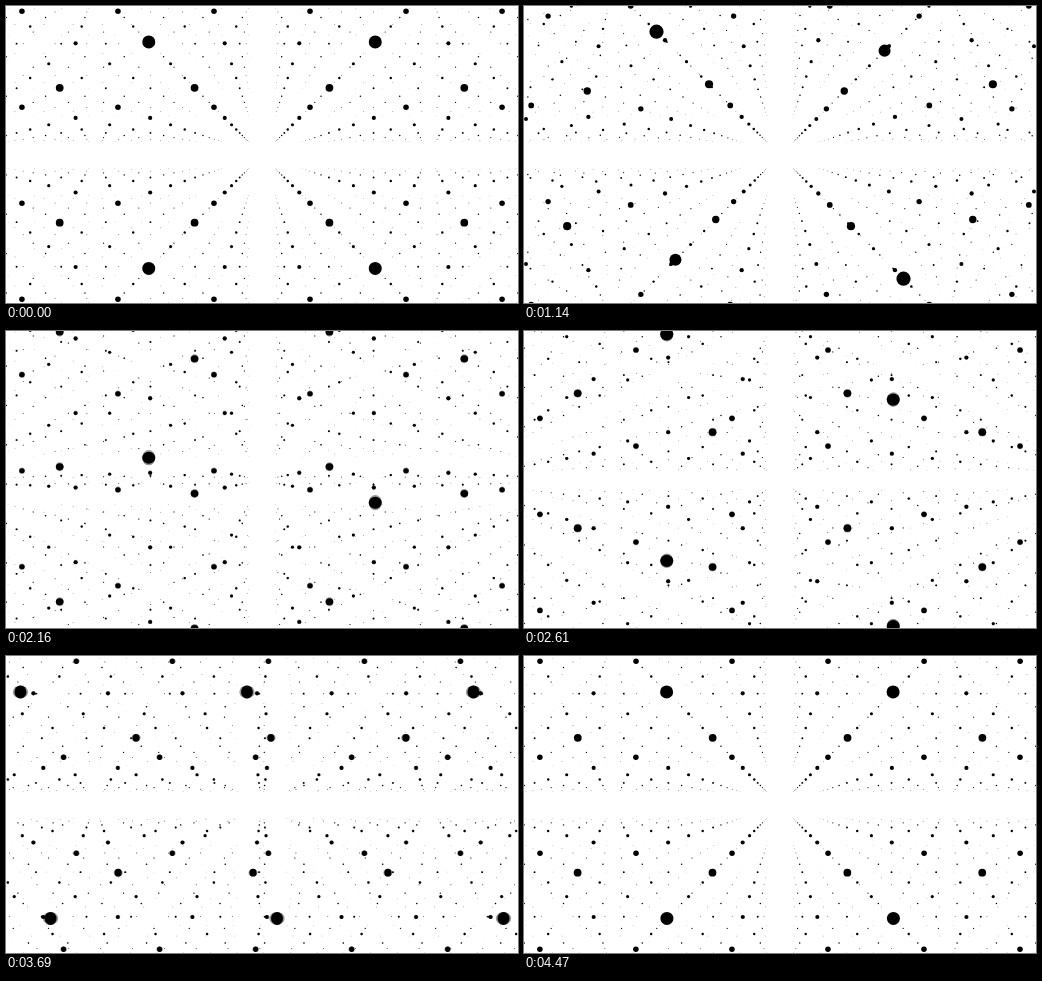
Animation of 512 by 297 pixels, one loop 4.5 s. Source, as an HTML page with a canvas:

```html
<!DOCTYPE html>
<html lang="en">
<head>
<meta charset="utf-8">
<title>Lattice</title>
<style>
  html, body { margin: 0; width: 100%; height: 100%; overflow: hidden; background: #fff; }
  canvas { display: block; width: 512px; height: 297px; }
</style>
</head>
<body>
<canvas id="stage" width="512" height="297"></canvas>
<script>
const W = 512, H = 297, CX = 256, CY = 149.2;
const LOOP = 4500, PHASE = 1500, STEP = 30;
const CELL = 333.4;     // lattice spacing in pixels at depth 1
const NEAR = 0.472;     // depth of the first layer
const LAYERS = 15, FAR = 14.5, FADE = 10.5;
const DOT = 9.6, SHUTTER = 0.003;
const ctx = document.getElementById('stage').getContext('2d');

const clamp = v => Math.max(0, Math.min(1, v));
const mix = (a, b, t) => a + (b - a) * t;
const parity = n => (n & 1) === 0 ? 1 : -1;

function ease(t) {
  const p = clamp(t);
  const soft = p * p * (3 - 2 * p);
  const softer = p * p * p * (10 - 15 * p + 6 * p * p);
  return mix(soft, softer, 0.44);
}

function ellipse(x, y, rx, ry) {
  ctx.beginPath();
  ctx.ellipse(x, y, rx, ry, 0, 0, Math.PI * 2);
  ctx.fill();
}

// bx, by: half the distance travelled while the shutter is open
function dot(x, y, r, bx, by) {
  if (bx + by < 0.15) return ellipse(x, y, r, r);
  const core = b => Math.max(r * 0.7, r - b * 0.5);
  ctx.globalAlpha = 0.4;
  ellipse(x, y, r + bx, r + by);
  ctx.globalAlpha = 1;
  ellipse(x, y, core(bx), core(by));
}

function draw(time) {
  const axis = Math.floor(time / PHASE);    // 0: depth, 1: vertical, 2: horizontal
  const p = (time % PHASE) / PHASE;
  const move = ease(p);
  const blur = (ease(p + SHUTTER) - ease(p - SHUTTER)) / 2;
  const shift = (on, n) => axis === on ? parity(n) * move : 0;

  ctx.fillStyle = '#fff';
  ctx.fillRect(0, 0, W, H);
  ctx.fillStyle = '#000';

  for (let k = LAYERS - 1; k >= 0; k--) {
    const reach = (k + NEAR + 1) / CELL / 2;
    const nx = Math.ceil(W * reach) + 1;
    const ny = Math.ceil(H * reach) + 1;

    for (let j = -ny; j < ny; j++) {
      for (let i = -nx; i < nx; i++) {
        const z = k + NEAR + shift(0, i + j);
        if (z < 0.3 || z >= FAR) continue;
        const cell = CELL / z;
        const x = CX + (i + 0.5 + shift(2, j + k)) * cell;
        const y = CY + (j + 0.5 + shift(1, i + k)) * cell;
        const r = DOT / z * Math.pow(clamp((FAR - z) / FADE), 0.75);
        if (x < -r - 3 || x > W + r + 3 || y < -r - 3 || y > H + r + 3) continue;
        dot(x, y, r, axis === 2 ? blur * cell : 0, axis === 1 ? blur * cell : 0);
      }
    }
  }
}

const start = performance.now();
function tick() {
  const t = (performance.now() - start) % LOOP;
  draw(Math.floor(t / STEP) * STEP);
  requestAnimationFrame(tick);
}
tick();
</script>
</body>
</html>
```
